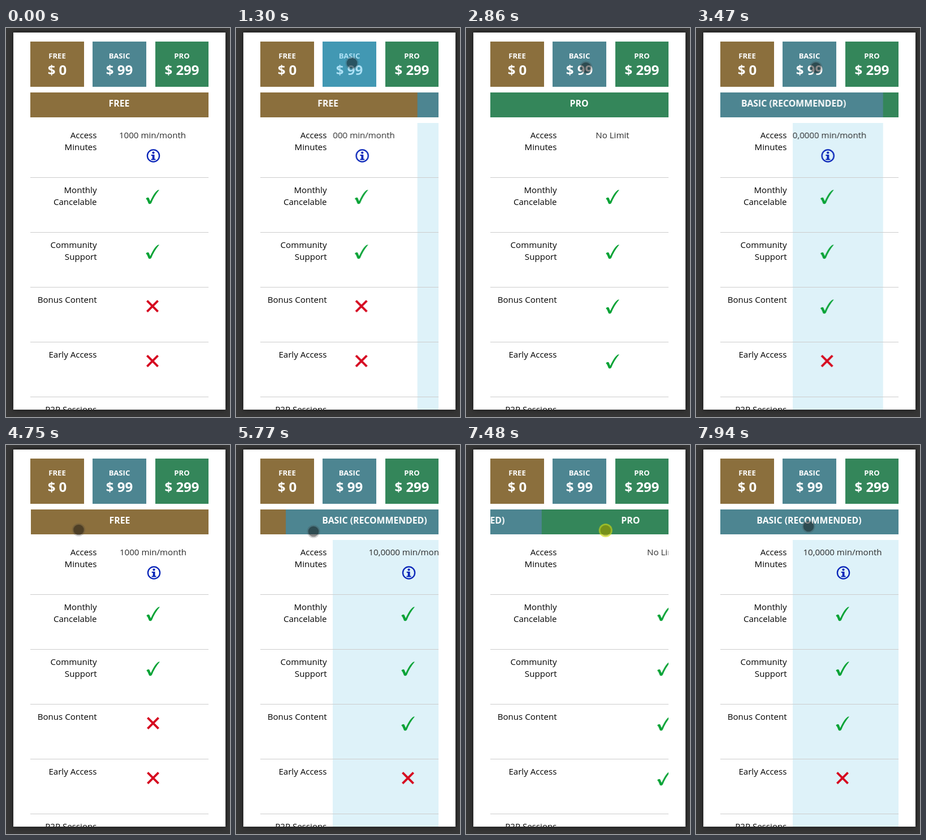
These frames come from a looping animation (396x688 px, 8 s). An HTML page:

```html
<!DOCTYPE html>
<html lang="en">
<head>
<meta charset="utf-8">
<title>Plan comparison</title>
<style>
  html, body { margin: 0; width: 100%; height: 100%; overflow: hidden; background: #363636; }
  svg { display: block; font-family: "Open Sans", "Noto Sans", sans-serif; font-size: 15.1px; }
  .sheet { fill: #fff; filter: drop-shadow(0 0 5px rgba(0, 0, 0, .6)); }
  .mid { text-anchor: middle; }
  .label { text-anchor: end; fill: #000; }
  .cell { fill: #2b2b2b; }
  .title, .plan, .price { font-weight: 700; fill: #fff; }
  .title { font-size: 15.8px; }
  .plan { font-size: 13.1px; }
  .price { font-size: 24px; }
  .line { stroke: #ccc; }
  .check { fill: #08a336; }
  .cross { stroke: #d60a20; stroke-width: 3.9; fill: none; }
</style>
</head>
<body>
<svg id="stage" width="396" height="688" viewBox="0 0 396 688">
  <defs>
    <clipPath id="sheetClip"><rect x="13" y="8" width="375" height="667"/></clipPath>
    <clipPath id="headClip"><rect x="43" y="114" width="315" height="44"/></clipPath>
    <clipPath id="bodyClip"><rect x="171" y="168" width="187" height="507"/></clipPath>
    <path id="check" class="check" d="M-11.7 3.6C-10.3 1.2-7 .6-6.3 2.4L-4 8C-.2-.8 4.6-8.6 9.2-11.8L12-12.2C6-5 1.2 3-2 11C-2.8 12.9-6 13.4-7 12C-8.2 9.5-9.6 5-11.7 3.6Z"/>
    <path id="cross" class="cross" d="M-9.6-9.6L9.6 9.6M9.6-9.6L-9.6 9.6"/>
    <g id="info">
      <circle r="10.6" fill="none" stroke="#0522b8" stroke-width="2.3"/>
      <circle cy="-5.4" r="2.1" fill="#0522b8"/>
      <path d="M-3.8-2H2V5.6H4V7.6H-4V5.6H-1.8V0H-3.8Z" fill="#0522b8"/>
    </g>
  </defs>
  <rect class="sheet" x="13" y="8" width="375" height="667"/>
  <g clip-path="url(#sheetClip)">
    <g id="buttons"></g>
    <g clip-path="url(#headClip)"><g id="heads"></g></g>
    <g clip-path="url(#bodyClip)"><g id="cells"></g></g>
    <g id="rows"></g>
  </g>
  <g id="cursor">
    <g id="idle">
      <circle r="11.5" fill="rgba(60,60,60,.22)"/>
      <circle r="9.3" fill="rgba(0,0,0,.36)"/>
    </g>
    <g id="press">
      <circle r="12" fill="rgba(205,215,20,.68)"/>
      <circle r="9.3" fill="rgba(70,85,0,.42)"/>
    </g>
  </g>
</svg>
<script>
const LOOP = 8000, PANEL = 315, ROW = 97;
const NS = 'http://www.w3.org/2000/svg';
const $ = id => document.getElementById(id);

function add(parent, tag, attrs, text) {
  const el = document.createElementNS(NS, tag);
  for (const k in attrs) el.setAttribute(k, attrs[k]);
  if (text) el.textContent = text;
  parent.append(el);
  return el;
}
const write = (parent, cls, x, y, text) => add(parent, 'text', { class: cls, x, y }, text);
const icon = (parent, name, x, y) => add(parent, 'use', { href: '#' + name, x, y });

const plans = [
  { name: 'FREE', price: '$ 0', title: 'FREE', color: '#8b6f3d', x: 43, w: 95,
    minutes: '1000 min/month', info: true, checks: 2, tap: 4230 },
  { name: 'BASIC', price: '$ 99', title: 'BASIC (RECOMMENDED)', color: '#4d8591', x: 153, w: 95,
    minutes: '10,0000 min/month', info: true, checks: 3, tint: '#def2f9', tap: 1230 },
  { name: 'PRO', price: '$ 299', title: 'PRO', color: '#34865a', x: 264, w: 94,
    minutes: 'No Limit', checks: 4, tap: 2190 }
];
const labels = [['Access', 'Minutes'], ['Monthly', 'Cancelable'], ['Community', 'Support'],
  ['Bonus Content'], ['Early Access'], ['P2P Sessions']];

// Keys are [ms, value, easing towards the next key].
function play(el, keys, toStyle) {
  const all = keys.slice();
  if (all[0][0] > 0) all.unshift([0, all[0][1]]);
  const last = all[all.length - 1];
  if (last[0] < LOOP) all.push([LOOP, last[1]]);
  el.animate(all.map(([t, v, easing = 'linear']) => ({ offset: t / LOOP, easing, ...toStyle(v) })),
    { duration: LOOP, iterations: Infinity });
}
const opacity = v => ({ opacity: v });
const shift = v => ({ transform: `translate(${-v}px, 0px)` });
const place = ([x, y]) => ({ transform: `translate(${x}px, ${y}px)` });
const HOLD = 'steps(1, end)', IO = 'ease-in-out', OUT = 'cubic-bezier(.33, .66, .66, 1)', IN = 'cubic-bezier(.33, 0, .66, .33)';

// Tap highlight: appears at once, then fades.
const flash = times => times.flatMap(t =>
  [[t - 5, 0, HOLD], [t, 1], [t + 110, 1], [t + 190, 0]]);

plans.forEach((p, i) => {
  const mid = p.x + p.w / 2, left = 43 + i * PANEL, center = 259 + i * PANEL;
  const box = { x: p.x, y: 24, width: p.w, height: 80 };
  add($('buttons'), 'rect', { ...box, fill: p.color });
  write($('buttons'), 'plan mid', mid, 54, p.name);
  write($('buttons'), 'price mid', mid, 83, p.price);
  const glow = add($('buttons'), 'rect', { ...box, fill: 'rgba(51,181,229,.4)' });
  play(glow, flash(i === 1 ? [p.tap, 3236] : [p.tap]), opacity);

  add($('heads'), 'rect', { x: left, y: 114, width: PANEL, height: 44, fill: p.color });
  write($('heads'), 'title mid', 200 + i * PANEL, 139, p.title);

  add($('cells'), 'rect', { x: left, y: 168, width: PANEL, height: 507, fill: p.tint || '#fff' });
  write($('cells'), 'cell mid', center, 195, p.minutes);
  if (p.info) icon($('cells'), 'info', center + 1.5, 226);
  for (let r = 1; r < 5; r++) {
    const ok = r <= p.checks;
    icon($('cells'), ok ? 'check' : 'cross', center, (ok ? 201.5 : 201) + r * ROW);
  }
});

labels.forEach((lines, r) => {
  lines.forEach((s, n) => write($('rows'), 'label', 160.5, 195 + r * ROW + n * 21, s));
  const y = 264.5 + r * ROW;
  if (r < 5) add($('rows'), 'line', { class: 'line', x1: 43, x2: 358, y1: y, y2: y });
});

// Four taps, then three swipes that snap to the next panel.
const scroll = [
  [1230, 0, IO], [1526, 315], [2191, 315, IO], [2487, 630], [3236, 630, IO], [3532, 315],
  [4230, 315, IO], [4526, -1],
  [5340, -1, IN], [5600, 126, OUT], [5935, 315],
  [6400, 315, IN], [6650, 441, OUT], [6985, 630],
  [7230, 630, IN], [7480, 540], [7620, 433, OUT], [7900, 315]
];
play($('heads'), scroll, shift);
play($('cells'), scroll, shift);

play($('cursor'), [
  [70, [333, 637], IO], [610, [205, 62]],
  [1450, [205, 62], IO], [2010, [309, 76]],
  [2400, [309, 76], IO], [2850, [212, 70]],
  [3500, [212, 70], IO], [3925, [95, 68]],
  [4450, [95, 68], IN], [4750, [128, 150]], [4900, [191, 150], OUT], [5150, [256, 150]],
  [5340, [256, 150], IN], [5600, [130, 152]], [5770, [137, 153], IO], [6075, [256, 150]],
  [6400, [256, 150], IN], [6650, [130, 152]], [6800, [132, 152], IO], [7085, [156, 151]],
  [7230, [156, 151], IN], [7480, [246, 151]], [7620, [353, 148]],
  [7690, [353, 148], IO], [7940, [199, 144]]
], place);

const presses = [[1070, 1230], [2080, 2190], [3090, 3236], [4100, 4230], [5210, 5600], [6310, 6650], [7230, 7620]];
const toggle = (a, b) => [[0, a, HOLD], ...presses.flatMap(([down, up]) => [[down, b, HOLD], [up, a, HOLD]])];
play($('press'), toggle(0, 1), opacity);
play($('idle'), [[0, 0, HOLD], [70, 1, HOLD], ...toggle(1, 0).slice(1)], opacity);
</script>
</body>
</html>
```
